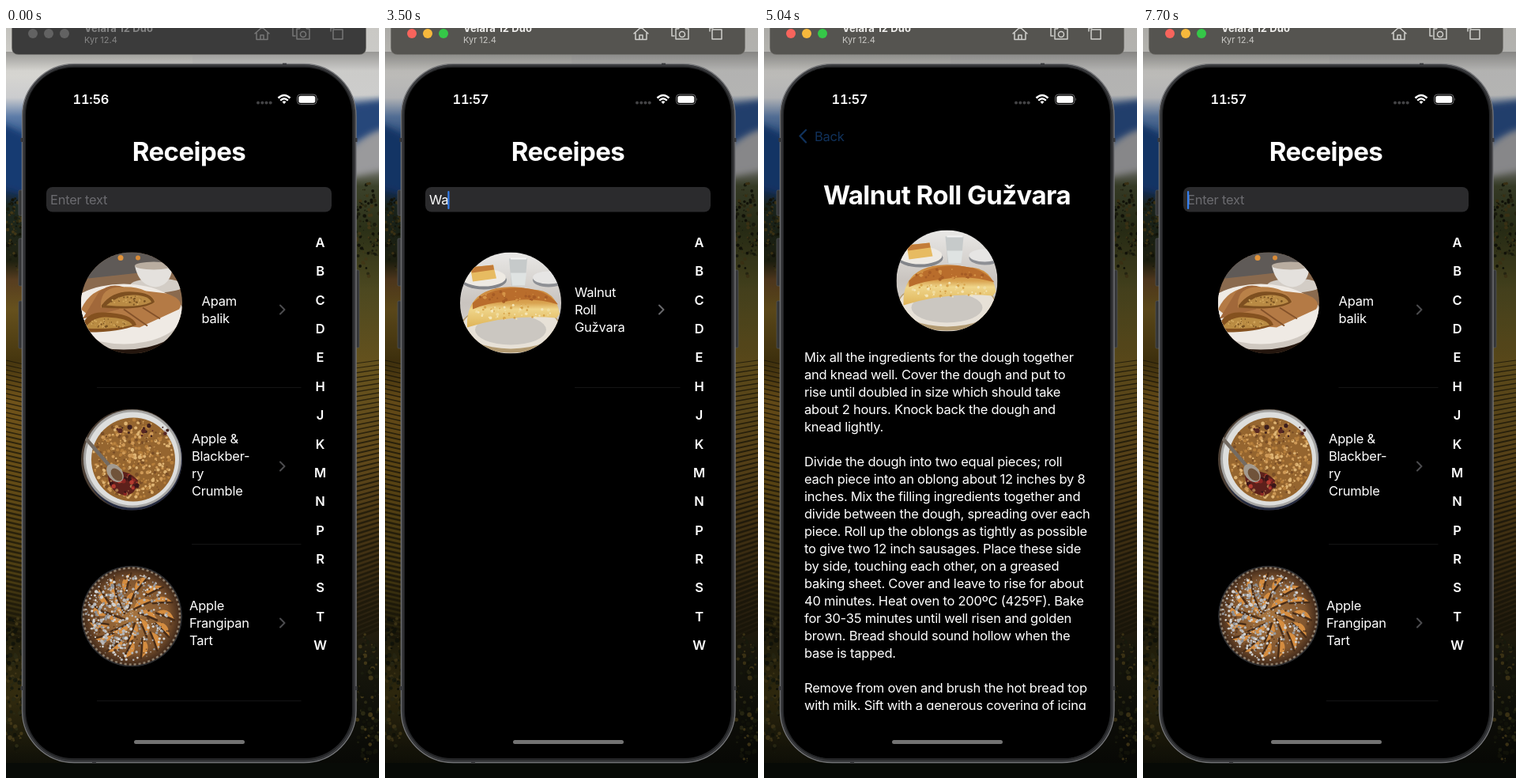
Animation of 472 by 948 pixels, one loop 8000 ms. Source, as an HTML page:

```html
<!DOCTYPE html>
<html lang="en">
<head>
<meta charset="utf-8">
<title>Recipe search</title>
<style>
html, body { margin: 0; width: 100%; height: 100%; overflow: hidden; background: #0a0c08; }
svg { display: block; width: 100vw; height: 100vh; }
text { font-family: Inter, "Noto Sans", sans-serif; font-size: 16.5px; letter-spacing: -.23px; fill: #fff; white-space: pre; }
.title { font-size: 33px; font-weight: 700; letter-spacing: -.55px; text-anchor: middle; }
.index { font-weight: 600; text-anchor: middle; }
.menu { font-size: 14.6px; text-anchor: middle; }
.line { fill: none; stroke-linecap: round; stroke-linejoin: round; }
#clock { font-weight: 600; letter-spacing: -.3px; font-variant-numeric: tabular-nums; }
</style>
</head>
<body>
<svg viewBox="0 0 472 948" preserveAspectRatio="none">
  <defs>
    <linearGradient id="skyL" x2="0" y2="1"></linearGradient>
    <linearGradient id="skyR" x2="0" y2="1"></linearGradient>
    <linearGradient id="barShade" x2="0" y2="1">
      <stop stop-color="#000" stop-opacity=".25"/><stop offset="1" stop-color="#000" stop-opacity="0"/>
    </linearGradient>
    <linearGradient id="cloth" x2="0" y2="1">
      <stop stop-color="#e9e8e6"/><stop offset=".5" stop-color="#c9c4bf"/><stop offset="1" stop-color="#dedad5"/>
    </linearGradient>
    <linearGradient id="pastry" x2="0" y2="1">
      <stop stop-color="#c8823a"/><stop offset=".4" stop-color="#d9a350"/><stop offset=".55" stop-color="#efd58a"/><stop offset="1" stop-color="#dfb458"/>
    </linearGradient>
    <radialGradient id="tartFill">
      <stop stop-color="#a9763f"/><stop offset=".75" stop-color="#80552f"/><stop offset="1" stop-color="#40291a"/>
    </radialGradient>
    <filter id="soft" x="-50%" y="-50%" width="200%" height="200%"><feGaussianBlur stdDeviation="4"/></filter>
    <clipPath id="round"><circle r="64"/></clipPath>
    <clipPath id="glass"><rect x="25" y="50" width="413" height="873" rx="60"/></clipPath>
    <clipPath id="screen" clip-path="url(#glass)"><rect x="35" y="50" width="393" height="873"/></clipPath>
    <clipPath id="bodyClip"><rect x="35" y="240" width="393" height="622"/></clipPath>

    <g id="pancake" clip-path="url(#round)">
      <rect x="-64" y="-64" width="128" height="128" fill="#8a6a4e"/>
      <path d="M-64-64H64V-44L-64-30Z" fill="#5f5a57"/>
      <circle cx="-14" cy="-57" r="3.500" fill="#e2943c"/><circle cx="8" cy="-57" r="3" fill="#d98b38"/>
      <ellipse cx="32" cy="-22" rx="34" ry="9" fill="#d3cdc6"/>
      <path d="M4-47H52Q50-22 30-20Q9-22 4-47Z" fill="#e4e1dd"/>
      <ellipse cx="28" cy="-47" rx="24" ry="5" fill="#b9ada0"/>
      <path d="M-64 30L64 14V64H-64Z" fill="#24160e"/>
      <ellipse cx="-10" cy="18" rx="78" ry="41" fill="#cfc8c0"/>
      <ellipse cx="-10" cy="14" rx="74" ry="38" fill="#efeae4"/>
      <path d="M-64 8Q-52-18-24-20L44-12Q68-4 60 8L10 31L-42 26Z" fill="#b47a45"/>
      <path d="M-42-13Q-28-26-10-20L-16 8L-62 20Z" fill="#a1683a"/>
      <path d="M-39 1Q-38-20-14-20Q22-22 30-1Q18 10-39 6Z" fill="#b98148"/>
      <path d="M-38 3Q-24-16 2-14Q26-13 29-1Q14 10-38 6Z" fill="#7d4f20"/>
      <path d="M-32 3Q-16-11 4-10Q22-9 25-1Q8 7-32 3Z" fill="#b98a44"/>
      <path d="M-64 32Q-58 11-36 12Q2 13 6 28Q-18 38-62 37Z" fill="#84511f"/>
      <path d="M-60 32Q-48 17-32 18Q-4 19 1 28Q-22 34-60 32Z" fill="#b98b42"/>
      <path d="M-10 8L20 29M14 6L36 20" stroke="#84522a" stroke-width="2"/>
      <g id="pancakeDots"></g>
    </g>
    <g id="crumble" clip-path="url(#round)">
      <rect x="-64" y="-64" width="128" height="128" fill="#4c3f34"/>
      <circle cx="3" cy="2" r="63" fill="#252b40"/>
      <circle cx="1" cy="-1" r="62" fill="#a5a4a2"/>
      <circle cx="1" cy="-1" r="59" fill="#dddedd"/>
      <circle cx="2" cy="0" r="53" fill="#95652f"/>
      <g id="crumbs"></g>
      <path d="M-30 16Q-8 10 8 26Q6 46-10 45Q-31 40-30 16Z" fill="#5d201b"/>
      <g id="berries"></g>
      <path class="line" d="M-60-29L-28 8" stroke="#746b62" stroke-width="4.500"/>
      <ellipse cx="-21" cy="17" rx="9" ry="13" fill="#a39a8f" transform="rotate(-40 -21 17)"/>
      <ellipse cx="-19" cy="19" rx="6" ry="9" fill="#70533a" transform="rotate(-40 -19 19)"/>
    </g>
    <g id="tart" clip-path="url(#round)">
      <circle r="64" fill="#2d2d2f"/><circle r="62" fill="url(#tartFill)"/>
      <circle r="61" fill="none" stroke="#8f7f6c" stroke-width="2.500" stroke-dasharray="3 3"/>
      <g id="slices"></g><g id="sugar"></g>
    </g>
    <g id="roll" clip-path="url(#round)">
      <rect x="-64" y="-64" width="128" height="128" fill="url(#cloth)"/>
      <ellipse cx="-34" cy="-29" rx="29" ry="12" fill="#83858a"/>
      <ellipse cx="-34" cy="-32" rx="28" ry="11" fill="#eeeae3"/>
      <path d="M-51-45L-22-48L-18-31L-48-27Z" fill="#e7bb61"/><path d="M-51-45L-22-48L-21-42L-49-38Z" fill="#c37c38"/>
      <ellipse cx="48" cy="-29" rx="20" ry="9" fill="#8e9095"/><ellipse cx="48" cy="-32" rx="20" ry="8" fill="#e6e5e4"/>
      <path d="M-2-56H21L18-22H1Z" fill="#c6caca"/><path d="M0-38H20L18-22H2Z" fill="#dfe3e2"/>
      <path d="M0-56H20" stroke="#f4f4f3" stroke-width="2"/>
      <ellipse cx="0" cy="32" rx="64" ry="31" fill="#b39b72"/>
      <ellipse cx="0" cy="30" rx="61" ry="28" fill="#e7e1d7"/>
      <ellipse cx="0" cy="34" rx="45" ry="19" fill="#cbc7c1"/>
      <path d="M-55 22Q-53-4-32-14Q-8-25 28-17Q58-16 62 14L58 19Q0 14-55 31Z" fill="url(#pastry)"/>
      <path d="M-48 0Q-30-17 4-19Q44-20 60 2Q28-8-5-2Q-30 0-48 8Z" fill="#b96d2c"/>
      <g id="rollDots"></g>
    </g>
  </defs>

  <g id="wallpaper">
    <rect width="236" height="948" fill="url(#skyL)"/>
    <rect x="236" width="236" height="948" fill="url(#skyR)"/>
    <path d="M-10 118L30 138V212L-10 200Z" fill="#173a72" filter="url(#soft)"/>
    <path d="M430 98L482 90V128L430 150Z" fill="#27477a" filter="url(#soft)"/>
    <path d="M430 165Q455 130 482 128V178L430 190Z" fill="#9a9a9c" filter="url(#soft)"/>
    <g id="field"></g>
    <rect y="929" width="472" height="19" fill="#080b07"/>
    <rect y="30" width="472" height="24" fill="url(#barShade)"/>
  </g>
  <rect id="shade" width="472" height="948" fill="#000"/>

  <path id="bar" d="M7.500-2H455.500V25Q455.500 33.500 447 33.500H16Q7.500 33.500 7.500 25Z" stroke="#777571" stroke-opacity=".6"/>
  <g id="lights"><circle cx="34" cy="7" r="6"/><circle cx="54" cy="7" r="6"/><circle cx="74" cy="7" r="6"/></g>
  <text id="device" x="99" y="5" style="font-size:13px;font-weight:700;letter-spacing:.1px">Velara 12 Duo</text>
  <text id="system" x="99" y="19" style="font-size:11px;letter-spacing:0">Kyr 12.4</text>
  <g id="tools" class="line" stroke-width="1.500">
    <path d="M315 7L324-1L333 7M317 6V14.500H331V6M322 14V9H326V14"/>
    <path d="M368 1H371L373-1H379L381 1H384V14H368ZM365-1H363V10H366"/><circle cx="376" cy="8" r="3.500"/>
    <path d="M414 2H426V14H414ZM411 4V0H415"/>
  </g>

  <g fill="#343537" stroke="#55565a" stroke-width=".7">
    <rect x="16" y="205" width="6" height="32" rx="1.500"/><rect x="16" y="266" width="6" height="60" rx="1.500"/>
    <rect x="16" y="345" width="6" height="60" rx="1.500"/><rect x="441" y="306" width="6" height="98" rx="1.500"/>
  </g>
  <rect x="20.500" y="45.500" width="422.500" height="883" rx="66" fill="#242527" stroke="#747578" stroke-width="1.400"/>
  <rect x="22.500" y="47.500" width="418.500" height="879" rx="64" fill="none" stroke="#3c3d40" stroke-width="1.500"/>
  <path d="M20 139v5M20 832v5M443 139v5M443 832v5M350 46h5M109 928h5" stroke="#38393c" stroke-width="3"/>
  <rect x="25" y="50" width="413" height="873" rx="60" fill="#000"/>

  <g clip-path="url(#screen)">
    <g id="list">
      <text class="title" x="231.500" y="168">Receipes</text>
      <rect x="51" y="201" width="361" height="31.500" rx="8" fill="#2b2b2d"/>
      <text id="query" x="56" y="223"></text>
      <rect id="caret" y="206" width="2.200" height="23" rx="1" fill="#347ff0"/>
      <g id="index"></g>
      <g id="all"></g>
      <g id="found">
        <rect id="pressed" x="51" y="257" width="323" height="198" fill="#3a3a3c"/>
      </g>
      <rect id="dim" x="-100" y="50" width="700" height="873" fill="#000"/>
    </g>
    <g id="detail">
      <rect x="35" y="50" width="393" height="873" fill="#000"/>
      <g id="back">
        <path class="line" d="M53 129L45.500 136.500L53 144.500" stroke="#2b82ee" stroke-width="2.300"/>
        <text x="64" y="143" style="fill:#2b82ee">Back</text>
      </g>
      <text class="title" x="231.500" y="223">Walnut Roll Gužvara</text>
      <use href="#roll" x="231.500" y="319.500"/>
      <g id="steps" clip-path="url(#bodyClip)"></g>
    </g>
    <g id="popup">
      <path d="M61 152H194Q204 152 204 162V181.500Q204 191.500 194 191.500H86L78 199L70 191.500H61Q51 191.500 51 181.500V162Q51 152 61 152Z" fill="#232324"/>
      <path d="M121.500 152V191.500" stroke="#111112"/>
      <text class="menu" x="86" y="177">Paste</text><text class="menu" x="163" y="177">AutoFill</text>
    </g>
  </g>

  <text id="clock" y="96"></text>
  <g fill="#434345"><circle cx="319" cy="94.500" r="2"/><circle cx="324.300" cy="94.500" r="2"/><circle cx="329.500" cy="94.500" r="2"/><circle cx="334.700" cy="94.500" r="2"/></g>
  <g class="line" stroke="#fff" stroke-width="2.400" style="stroke-linecap:butt">
    <path d="M344.500 88.500Q352 81.500 359.500 88.500M347.200 91.700Q352 87 356.800 91.700"/>
    <path d="M349.500 93.200Q352 91.200 354.500 93.200L352 96Z" fill="#fff" stroke="none"/>
  </g>
  <rect x="368.500" y="84" width="24.500" height="12.500" rx="4" fill="none" stroke="#767678"/>
  <rect x="370.300" y="85.800" width="21" height="9" rx="2.500" fill="#fff"/>
  <path d="M394.500 88.200Q396.300 90.200 394.500 92.300Z" fill="#767678"/>
  <rect id="home" x="162" y="900" width="140" height="5" rx="2.500"/>
</svg>
<script>
const LOOP = 8000, STEP = 70;
const el = id => document.getElementById(id);
const add = (id, markup) => el(id).insertAdjacentHTML('beforeend', markup);
const set = (id, name, value) => el(id).setAttribute(name, value);
const show = (id, alpha) => set(id, 'opacity', alpha);
const ramp = (t, a, b) => Math.min(1, Math.max(0, (t - a) / (b - a)));

let seed = 7;
function rand(a = 0, b = 1) {
  seed = (seed * 16807) % 2147483647;
  return a + (b - a) * seed / 2147483647;
}
const pick = list => list[Math.floor(rand(0, list.length))];

// Scatters dots inside an ellipse.
function dots(id, n, cx, cy, rx, ry, size, colors) {
  let out = '';
  for (let i = 0; i < n; i++) {
    const a = rand(0, 6.283), d = Math.sqrt(rand());
    out += `<circle cx="${(cx + rx * d * Math.cos(a)).toFixed(1)}" cy="${(cy + ry * d * Math.sin(a)).toFixed(1)}" r="${rand(.5, size).toFixed(1)}" fill="${pick(colors)}"/>`;
  }
  add(id, out);
}

function gradient(id, stops) {
  add(id, stops.map(([y, c]) => `<stop offset="${y / 948}" stop-color="${c}"/>`).join(''));
}

function drawWallpaper() {
  gradient('skyL', [[0, '#c3c2bd'], [60, '#d6d5d1'], [88, '#cbccce'], [112, '#5d7ca8'], [150, '#1c447c'],
    [205, '#172f58'], [225, '#1c2820'], [295, '#1f2110'], [318, '#573d20'], [355, '#66511d'], [420, '#46360f'],
    [470, '#70531a'], [560, '#664d16'], [690, '#4c3d12'], [770, '#221f0c'], [840, '#332c0f'], [948, '#080a06']]);
  gradient('skyR', [[0, '#c9c8c4'], [85, '#cdcdcc'], [102, '#4d678f'], [132, '#64799a'], [168, '#8b8b8d'],
    [200, '#3c422a'], [255, '#2b3017'], [330, '#4c4820'], [430, '#66521d'], [540, '#61491a'], [640, '#473514'],
    [740, '#2b2210'], [800, '#17170c'], [948, '#060705']]);
  let rows = '';
  for (let y = 420; y < 770; y += 6) {
    const w = 1.2 + (y - 420) / 160;
    rows += `<path d="M0 ${y}l22 5M442 ${y + 4}l30 ${-4 - (y - 420) / 40}" stroke="#1a1609" stroke-width="${w}" opacity=".75"/>`;
  }
  add('field', rows);
  const leaves = ['#1a1c0e', '#2a2913', '#413717', '#121309'];
  dots('field', 90, 10, 262, 12, 48, 2.4, leaves);
  dots('field', 110, 458, 255, 16, 60, 2.4, leaves);
  dots('field', 130, 10, 830, 14, 90, 3, leaves);
  dots('field', 130, 458, 850, 16, 90, 3, leaves);
}

function drawFood() {
  dots('pancakeDots', 45, -28, 26, 25, 6, 1.3, ['#765020', '#d0a55b']);
  dots('pancakeDots', 40, -3, -3, 23, 6, 1.3, ['#765020', '#d0a55b']);
  dots('crumbs', 480, 2, -1, 51, 50, 2.4, ['#cf9a57', '#b57e3b', '#dfb473', '#7a4e26']);
  dots('crumbs', 16, 14, -37, 34, 8, 3.5, ['#3b1d1c', '#572621']);
  dots('berries', 32, -10, 31, 17, 13, 3, ['#8b2623', '#b43b30', '#3a1517', '#a8794b']);
  dots('rollDots', 55, 4, 12, 48, 11, 2, ['#f1dda0', '#d6a34a', '#f4e6b8']);
  dots('rollDots', 30, 6, -8, 45, 7, 2.2, ['#d59447', '#a65c25']);
  let slices = '';
  for (const [r, n] of [[42, 15], [20, 8]])
    for (let i = 0; i < n; i++)
      slices += `<g transform="rotate(${i * 360 / n}) translate(${r} 0)"><path d="M-11-5Q4-14 12 4Q1-1-11-5Z" fill="#d58d40"/><path class="line" d="M-11-4Q1 0 12 5" stroke="#472c18" stroke-width="2.500"/></g>`;
  add('slices', slices);
  dots('sugar', 420, -4, 0, 55, 56, 1.9, ['#d3d2d0', '#b4b4b5', '#98989b', '#5d3c22']);
  dots('sugar', 160, -25, -3, 27, 44, 2.3, ['#d3d3d3', '#b8b8ba', '#8e8f92']);
}

const lines = (x, y, rows) => rows.map((s, i) => `<text x="${x}" y="${y + 22 * i}">${s}</text>`).join('');

function row(id, food, mid, x, label, lineX, tone) {
  const top = mid + 17.5 - 11 * label.length;
  add(id, `<use href="#${food}" x="159" y="${mid}"/>${lines(x, top + (label.length > 3 ? 6 : 8), label)}
    <path class="line" d="M347 ${mid + 3}l5.500 5.500l-5.500 5.500" stroke="${tone}" stroke-width="2"/>
    <path class="rule" d="M${lineX} ${mid + 107}H373.500" stroke="#141415"/>`);
}

function drawScreens() {
  [...'ABCDEHJKMNPRSTW'].forEach((c, i) =>
    add('index', `<text class="index" x="397.500" y="${277 + 36.36 * i}">${c}</text>`));
  row('all', 'pancake', 347.5, 247.5, ['Apam', 'balik'], 115, '#4c4c4f');
  row('all', 'crumble', 545.5, 235, ['Apple &amp;', 'Blackber-', 'ry', 'Crumble'], 235, '#4c4c4f');
  row('all', 'tart', 743.5, 232, ['Apple', 'Frangipan', 'Tart'], 115, '#4c4c4f');
  row('found', 'roll', 347.5, 240, ['Walnut', 'Roll', 'Gužvara'], 240, '#68686b');
  add('steps', lines(51, 422, `Mix all the ingredients for the dough together
and knead well. Cover the dough and put to
rise until doubled in size which should take
about 2 hours. Knock back the dough and
knead lightly.

Divide the dough into two equal pieces; roll
each piece into an oblong about 12 inches by 8
inches. Mix the filling ingredients together and
divide between the dough, spreading over each
piece. Roll up the oblongs as tightly as possible
to give two 12 inch sausages. Place these side
by side, touching each other, on a greased
baking sheet. Cover and leave to rise for about
40 minutes. Heat oven to 200ºC (425ºF). Bake
for 30-35 minutes until well risen and golden
brown. Bread should sound hollow when the
base is tapped.

Remove from oven and brush the hot bread top
with milk. Sift with a generous covering of icing`.split('\n')));
}

// Critically damped slide: 1 at the start, settling to 0.
function settle(t, start) {
  const x = Math.max(0, t - start) * .018;
  return x > 9.4 ? 0 : (1 + x) * Math.exp(-x);
}

function caretAlpha(t) {
  if (t < 980) return ramp(t, 210, 420);
  if (t < 1120) return 1 - ramp(t, 910, 1050);
  if (t < 2940) return ramp(t, 1120, 1330);
  if (t < 3220) return 1 - ramp(t, 2870, 3080);
  if (t < 3850) return ramp(t, 3220, 3430);
  if (t < 6370) return 0;
  return t < 7280 ? 1 - ramp(t, 6930, 7070) : 1;
}

function typed(t) {
  if (t < 2380 || t >= 7420) return '';
  return t < 2450 || t >= 7350 ? 'W' : 'Wa';
}

function drawWindow(active) {
  const colors = active ? ['#f7645c', '#f6b83c', '#35c748'] : ['#626262', '#626262', '#626262'];
  [...el('lights').children].forEach((c, i) => c.setAttribute('fill', colors[i]));
  set('bar', 'fill', active ? '#555450' : '#3b3b3b');
  set('tools', 'stroke', active ? '#d0cfcc' : '#777777');
  el('device').style.fill = active ? '#f0efed' : '#858585';
  el('system').style.fill = active ? '#c9c8c5' : '#858585';
  show('shade', active ? .12 : 0);
}

function drawList(t) {
  const text = typed(t), rules = document.querySelectorAll('#all .rule');
  el('query').textContent = text || 'Enter text';
  el('query').style.fill = text ? '#fff' : '#6b6b6f';
  set('caret', 'x', [56, 71.5, 79.3][text.length]);
  show('caret', caretAlpha(t));
  show('all', text ? 0 : 1);
  show('found', text ? 1 : 0);
  show('pressed', t < 3850 ? 0 : 1 - ramp(t, 5560, 5810));
  const starts = t < 7280 ? [115, 235, 115] : [247.5, 235, 232];
  rules.forEach((r, i) => r.setAttribute('d', `M${starts[i]} ${454.5 + 198 * i}H373.500`));
}

function drawPages(t) {
  const away = t < 5180 ? settle(t, 3880) : 1 - settle(t, 5197);
  set('detail', 'transform', `translate(${393 * away} 0)`);
  show('detail', away < 1 ? 1 : 0);
  set('list', 'transform', `translate(${-118 * (1 - away)} 0)`);
  show('dim', .2 * (1 - away));
  show('back', t < 5040 ? 1 - away : .38 * (1 - away));
}

function drawPopup(t) {
  const p = ramp(t, 1610, 2030), ease = 1 - (1 - p) ** 3;
  const size = .5 + .5 * ease + .03 * Math.sin(Math.PI * p);
  set('popup', 'transform', `translate(78 199) scale(${size}) translate(-78 -199)`);
  show('popup', t < 2380 ? ramp(t, 1610, 1820) : t < 2450 ? .4 : 0);
}

function draw(now) {
  const t = Math.floor(now % LOOP / STEP) * STEP;
  drawWindow(t >= 1260);
  drawList(t);
  drawPages(t);
  drawPopup(t);
  const late = t >= 3360;
  el('clock').textContent = late ? '11:57' : '11:56';
  set('clock', 'x', late ? 85.5 : 84.5);
  const tone = t < 2590 ? 114 - 52 * ramp(t, 1610, 1960) : 114;
  set('home', 'fill', `rgb(${tone},${tone},${tone})`);
}

drawWallpaper();
drawFood();
drawScreens();
const begin = performance.now();
function tick() {
  draw(performance.now() - begin);
  requestAnimationFrame(tick);
}
tick();
</script>
</body>
</html>
```
